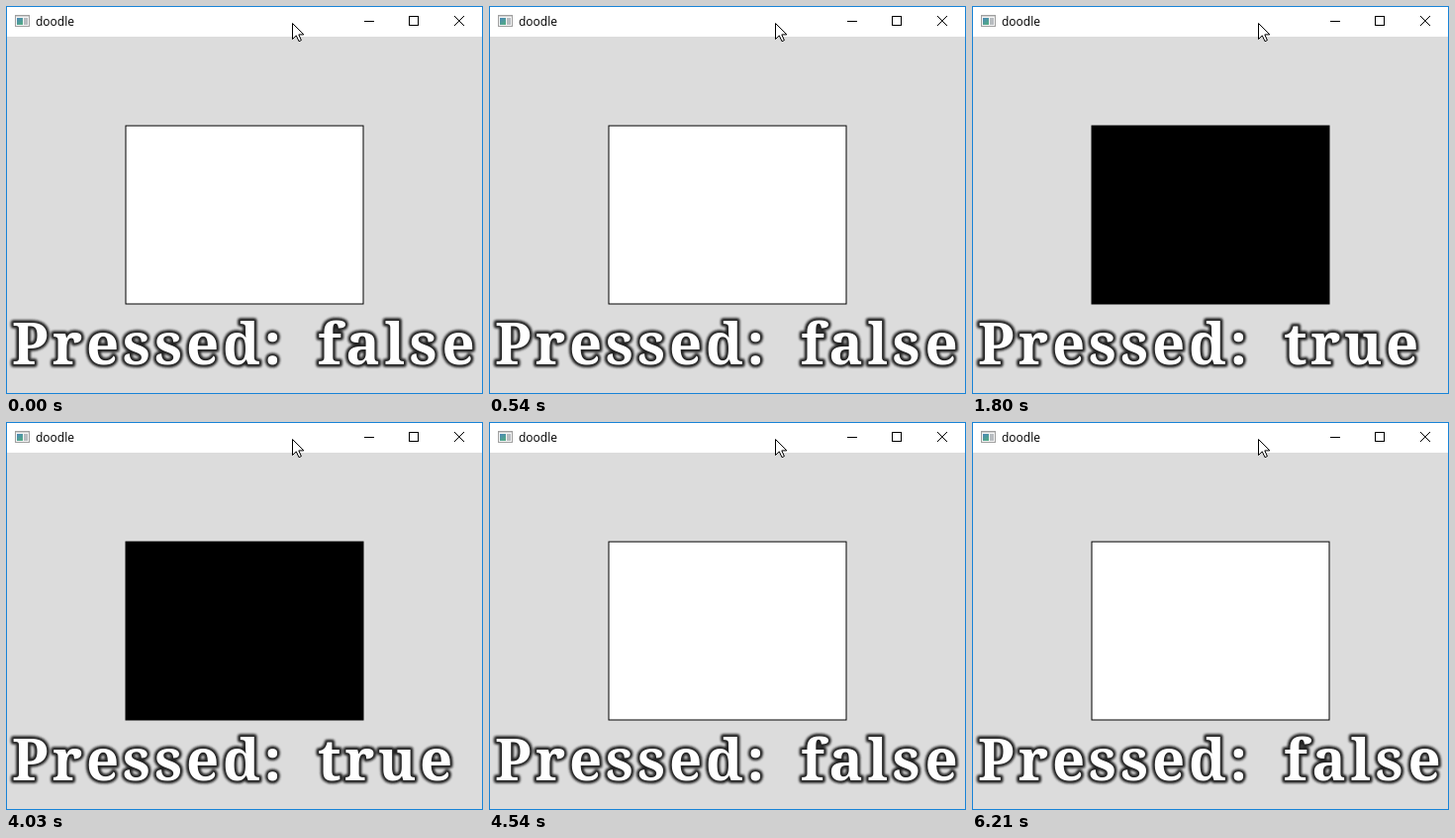
Recreate the animation shown at these times as an HTML page. Size 482 px wide and 392 px high, loop 6540 ms.

```html
<!DOCTYPE html>
<html lang="en">
<head>
<meta charset="utf-8">
<title>doodle</title>
<style>
  html, body { margin: 0; width: 100%; height: 100%; overflow: hidden; }
  svg { display: block; }
  .title { font: 12px "Open Sans", "Noto Sans", sans-serif; }
  .label { font: 700 58px "Noto Serif", serif; letter-spacing: 3.8px; }
  .false { letter-spacing: 4.6px; }
  .true { letter-spacing: 3.5px; }
  .glow { fill: #222; stroke: #222; stroke-width: 5.5; stroke-linejoin: round; filter: url(#soft); }
  .face { fill: #fff; }
</style>
</head>
<body>
<svg width="482" height="392" viewBox="0 0 482 392">
  <defs>
    <filter id="soft" filterUnits="userSpaceOnUse" x="0" y="300" width="482" height="80">
      <feGaussianBlur stdDeviation="1.1"/>
    </filter>
    <linearGradient id="pane" x2="0.6" y2="1">
      <stop stop-color="#4a86b8"/>
      <stop offset="1" stop-color="#52a987"/>
    </linearGradient>
  </defs>

  <!-- window -->
  <rect width="482" height="392" fill="#1883d7"/>
  <rect x="1" y="1" width="480" height="30" fill="#fff"/>
  <rect x="1" y="31" width="480" height="360" fill="#dcdcdc"/>

  <!-- title bar -->
  <rect x="9.5" y="9.5" width="14" height="11" fill="#f5f5f5" stroke="#a0a0a0"/>
  <path d="M10 10.5H23" stroke="#d0d0d0"/>
  <rect x="11" y="12" width="6" height="7" fill="url(#pane)"/>
  <rect x="18" y="12" width="4" height="7" fill="#b8bcc0"/>
  <text class="title" x="30" y="20">doodle</text>
  <g fill="none" stroke="#000">
    <path d="M362 15.5h10"/>
    <rect x="407.5" y="10.5" width="9" height="9"/>
    <path d="M453 10l10 10M463 10l-10 10"/>
  </g>

  <!-- button and state -->
  <rect id="box" x="121" y="121" width="240" height="180" stroke="#000"/>
  <g class="label" id="label"></g>

  <!-- pointer -->
  <path d="M289.5 17.5V33.5L293.3 29.9L296 35.7L298.4 34.6L295.8 28.9H300.8Z" fill="#fff" stroke="#000"/>
</svg>
<script>
const LOOP = 6540;
const presses = [[310, 540], [1800, 3110], [4030, 4540], [5700, 6210]];
const box = document.getElementById("box");
const label = document.getElementById("label");
let shown = null;

function words(state, layer) {
  return `<g class="${layer}"><text x="6" y="361.5">Pressed:</text>` +
    `<text class="${state}" x="315" y="361.5">${state}</text></g>`;
}

function draw(time) {
  const t = time % LOOP;
  const pressed = presses.some(([down, up]) => t >= down && t < up);
  if (pressed !== shown) {
    shown = pressed;
    box.setAttribute("fill", pressed ? "#000" : "#fff");
    label.innerHTML = words(pressed, "glow") + words(pressed, "face");
  }
}

const start = performance.now();
function tick() {
  draw(performance.now() - start);
  requestAnimationFrame(tick);
}
tick();
</script>
</body>
</html>
```
